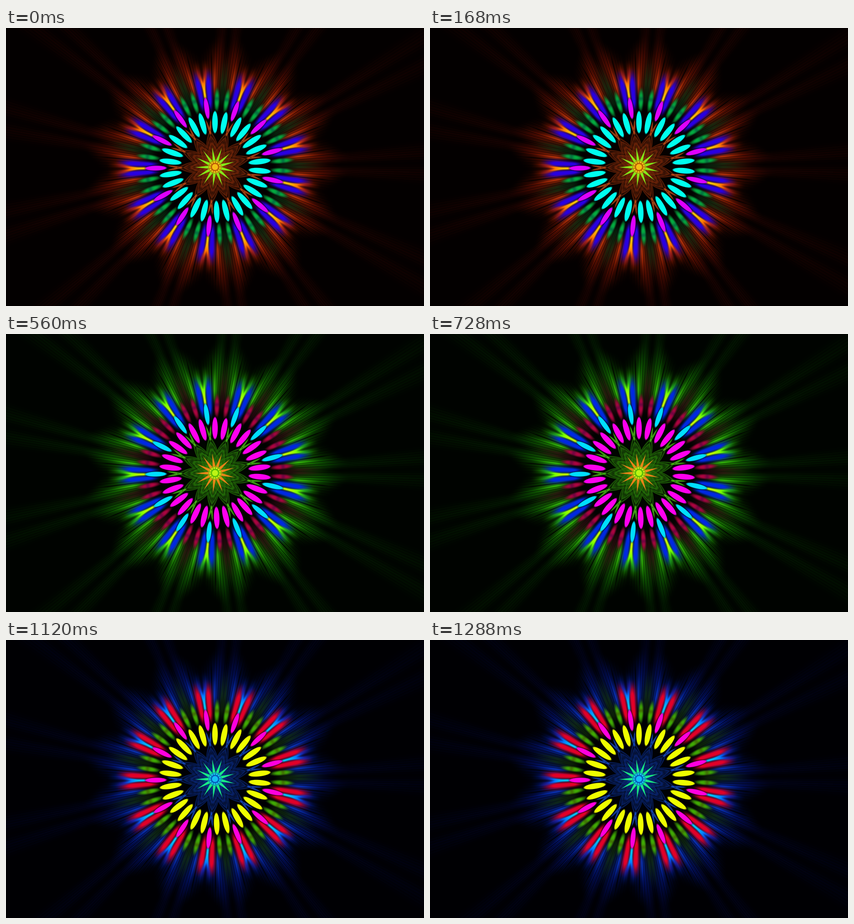
These frames come from a looping animation (918 px wide and 610 px high, 1400 ms). An HTML page with a canvas:

```html
<!DOCTYPE html>
<html lang="en">
<head>
<meta charset="utf-8">
<title>Kaleidoscope flower</title>
<style>
html, body { margin: 0; width: 100%; height: 100%; overflow: hidden; background: #000; }
canvas { display: block; }
</style>
</head>
<body>
<canvas width="918" height="610"></canvas>
<script>
const W = 918, H = 610, CX = 459, CY = 305;
const DEG = Math.PI / 180, SECTOR = 360 / 13, HALF = SECTOR / 2, BASE = 178.9;
const STEP = 280;
// Each step of the loop shows the same flower with its channels reordered.
const ORDERS = [[0, 1, 2], [1, 2, 0], [1, 0, 2], [0, 2, 1], [2, 1, 0]];

const { sin, cos, abs, exp, hypot, min, max } = Math;
const clamp = x => min(1, max(0, x));
const smooth = (a, b, x) => { const t = clamp((x - a) / (b - a)); return t * t * (3 - 2 * t); };
const bell = (x, w) => exp(-x * x / (w * w));

const c = [0, 0, 0];
function add(k, r, g, b) { c[0] += k * r; c[1] += k * g; c[2] += k * b; }
function cover(k, r, g, b) {
  c[0] += (r - c[0]) * k; c[1] += (g - c[1]) * k; c[2] += (b - c[2]) * k;
}

// Distance measure of an ellipse lying along the ray at angle `at`: 1 on its edge.
function ellipse(r, d, at, mid, len, wide) {
  const t = (d - at) * DEG;
  return hypot((r * cos(t) - mid) / len, r * sin(t) / wide);
}
const inside = (e, wide) => clamp((1 - e) * wide + .5);

// d: degrees from the spear axis, b: degrees from the axis between spears.
function farRays(r, d, b) {
  const k = smooth(190, 290, r) * exp(-(r - 250) / 300);
  const thread = .7 + .3 * sin(d * 9 + 1);
  add(k * thread * (bell(b - 2.6, 1.6) + .35 * bell(b - 4.6, 1)), 27, 3, 1);
}

function corona(r, d, b) {
  const fibre = .62 + .22 * sin(d * 7.5 + r * .01) + .16 * sin(d * 4.6 - r * .018);
  const start = smooth(140, 185, r);
  const gap = 1 - .8 * bell(d - 6.2, .5) * (1 - smooth(235, 260, r));
  // Red glow, longest beside the axis between spears
  const reach = 238 + 4.5 * min(d, 10) - 8 * max(0, 3 - b);
  const glow = start * (1 - smooth(reach - 85, reach + 18, r)) * fibre * gap;
  add(glow * (.55 + .45 * bell(d - 7.6, 2.6)), 165, 26, 2);
  add(glow * bell(d - 7.4, 1.6) * (1 - smooth(180, 240, r)), 100, 48, 6);

  // Green haze beyond the pods
  const haze = smooth(125, 155, r) * (1 - smooth(165, 250, r)) * bell(b, 3.4);
  cover(.8 * haze, 6, 46 * fibre + 8, 14);
  add(haze * bell(b - 1.2, .4) * smooth(165, 190, r), 0, 30, 10);

  // Flanks and the forked flame
  const flank = bell(d - 3.5, 2.1) * smooth(115, 148, r) * (1 - smooth(178, 222, r));
  cover(clamp(flank * 1.2), 40, 0, 225 + 25 * sin(d * 8));
  const fork = 2.4 * smooth(165, 222, r);
  const flame = (bell(d - fork, .7 + fork * .35) + .5 * bell(d, 1.1) * (1 - smooth(180, 205, r)))
    * smooth(140, 158, r) * (1 - smooth(175, 240, r));
  cover(clamp(flame * (.75 + .25 * fibre)), 255, 200 - 150 * smooth(160, 208, r), 0);
}

function heart(r, d, b) {
  const s = r * sin(d * DEG);
  const edge = 82 - 2.4 * d;
  const body = (1 - smooth(edge - 22, edge + 6, r)) * (1 - .3 * smooth(25, 70, r));
  const mesh = .78 + .22 * sin(r * .42 + d * .5) * cos(d * .9 - r * .12);
  add(body * mesh, 100, 33, 8);
  cover(.8 * bell(b, 3.6) * bell(r - 66, 10), 6, 1, 0);

  // Nested zigzag outlines
  for (const [top, slope, gain] of [[79, 2.2, .5], [68, 1.7, .4], [53, 1.2, .35]]) {
    cover(gain * bell(r - top + slope * d, 2.4), 180, 58, 12);
  }
  // Chevrons opening between the petals
  for (const from of [72, 82]) {
    const off = abs(d - 3.7 * (r - from) / 28) * r * DEG;
    const k = clamp(1.5 - off) * smooth(from - 2, from + 2, r) * (1 - smooth(98, 108, r));
    cover(.75 * k, 215, 85, 25);
  }
  // Central star
  add(bell(r, 24), 90, 42, 0);
  cover(clamp(4.9 * (1 - r / 45) - s + .3) * smooth(8, 13, r), 125, 235, 25);
  cover(clamp(1.6 * (1 - r / 28) - s + .2) * smooth(10, 16, r) * .7, 215, 205, 20);
  cover(clamp(15 - r) * .65, 205, 110, 8);
  cover(clamp(2.1 - hypot(r - 11, s)), 245, 215, 25);
  cover(clamp(7 - r), 245, 190, 20);
}

function shapes(r, d) {
  const pod = ellipse(r, d, HALF - 4.2, 147, 29, 6.8);
  cover(1 - smooth(.3, 1.1, pod), 4, 172 - 55 * bell(r - 150, 5), 64);
  const shade = ellipse(r, d, 8, 98.5, 28, 9);
  cover(.9 * (1 - smooth(.75, 1.1, shade)), 3, 0, 0);
  cover(inside(ellipse(r, d, 8, 98.5, 24, 6.1), 6.1), 0, 255, 238);
  const rim = ellipse(r, d, 0, 130, 25, 7.5);
  cover(.75 * (1 - smooth(.7, 1.1, rim)), 20, 0, 40);
  cover(inside(ellipse(r, d, 0, 130, 23, 5.2), 5.2), 222, 0, 255);
}

function paint(x, y) {
  const dx = x + .5 - CX, dy = y + .5 - CY, r = hypot(dx, dy);
  const turn = (Math.atan2(dy, dx) / DEG - BASE + 720 + HALF) % SECTOR;
  const d = abs(turn - HALF), b = HALF - d;
  c[0] = 3; c[1] = c[2] = 0;
  if (r > 190) farRays(r, d, b);
  if (r > 110 && r < 320) corona(r, d, b);
  if (r < 110) heart(r, d, b);
  if (r > 65 && r < 185) shapes(r, d);
}

const ctx = document.querySelector("canvas").getContext("2d");
const views = ORDERS.map(() => ctx.createImageData(W, H));
for (let y = 0, i = 0; y < H; y++) {
  for (let x = 0; x < W; x++, i += 4) {
    paint(x, y);
    ORDERS.forEach((order, n) => {
      const px = views[n].data;
      for (let k = 0; k < 3; k++) px[i + k] = c[order[k]];
      px[i + 3] = 255;
    });
  }
}

let shown = -1;
function tick() {
  const n = Math.floor(performance.now() / STEP) % views.length;
  if (n !== shown) ctx.putImageData(views[shown = n], 0, 0);
  requestAnimationFrame(tick);
}
tick();
</script>
</body>
</html>
```
